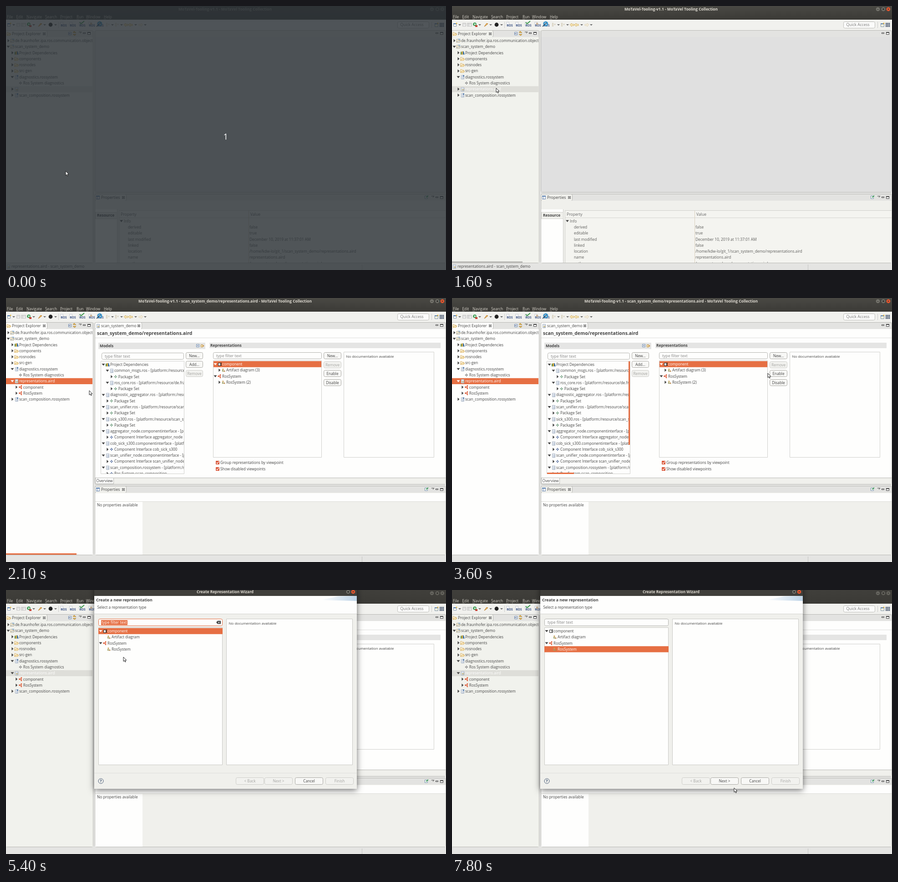
These frames come from a looping animation (967 by 579 pixels, 8 s). An HTML page with a canvas:

```html
<!DOCTYPE html>
<html lang="en">
<head>
<meta charset="utf-8">
<title>Representation wizard</title>
<style>
html, body { margin: 0; width: 100%; height: 100%; overflow: hidden; background: #3c3b37; }
canvas { display: block; }
</style>
</head>
<body>
<canvas id="stage" width="967" height="579"></canvas>
<script>
const g = document.getElementById('stage').getContext('2d');
const ORANGE = '#e66f43', INK = '#444', SOFT = '#5c5c5a', GREY = '#f0f0ec', EDGE = '#b9b9b5', WHITE = '#fefefd';
const FACE = '"Open Sans", "Noto Sans", sans-serif';
const PLAIN = 8.3, TAB = 8.6, BOLD = 'bold 8.4';
const APP = 'MoTaVel-Tooling-v1.1', SUITE = 'MoTaVel Tooling Collection';
const LOOP = 8000;

// ---- primitives ----
function box(x, y, w, h, fill, edge, r = 0) {
  g.beginPath();
  if (edge) g.roundRect(x + .5, y + .5, w - 1, h - 1, r);
  else g.roundRect(x, y, w, h, r);
  if (fill) { g.fillStyle = fill; g.fill(); }
  if (edge) { g.strokeStyle = edge; g.lineWidth = 1; g.stroke(); }
}
function text(s, x, y, color = INK, size = PLAIN, align = 'left') {
  g.font = `${size}px ${FACE}`;
  g.textAlign = align;
  g.fillStyle = color;
  g.fillText(s, x, y + 3);
}
function dot(x, y, r, color) {
  g.beginPath();
  g.arc(x, y, r, 0, 7);
  g.fillStyle = color;
  g.fill();
}
function poly(points, fill, edge, width = 1) {
  g.beginPath();
  for (let i = 0; i < points.length; i += 2) g.lineTo(points[i], points[i + 1]);
  if (fill) { g.closePath(); g.fillStyle = fill; g.fill(); }
  if (edge) { g.strokeStyle = edge; g.lineWidth = width; g.stroke(); }
}
function arrow(x, y, open, color = '#444') {
  poly(open ? [x - 3.5, y - 2, x + 3.5, y - 2, x, y + 2.5] : [x - 1.5, y - 3.5, x + 2.5, y, x - 1.5, y + 3.5], color);
}
const drop = (x, y) => poly([x - 3, y - 1, x + 3, y - 1, x, y + 2], '#666');
function cross(x, y) {
  poly([x - 2.5, y - 2.5, x + 2.5, y + 2.5], null, '#555', 2.4);
  poly([x + 2.5, y - 2.5, x - 2.5, y + 2.5], null, '#555', 2.4);
  poly([x - 2, y - 2, x + 2, y + 2], null, '#eee', .8);
  poly([x + 2, y - 2, x - 2, y + 2], null, '#eee', .8);
}
function clipped(x, y, w, h, draw) {
  g.save();
  g.beginPath();
  g.rect(x, y, w, h);
  g.clip();
  draw();
  g.restore();
}
function button(label, x, y, w, h, on = true, fill = '#f8f8f6') {
  box(x, y, w, h, on ? fill : '#f2f2ef', on ? '#aaa9a4' : '#cdcdc9', 3);
  text(label, x + w / 2, y + h / 2, on ? INK : '#a3a3a0', PLAIN, 'center');
}
function field(x, y, w, h, edge = '#b3b3af') {
  box(x, y, w, h, WHITE, edge, 3);
  text('type filter text', x + 7, y + h / 2, '#858585', 8.6);
}
function panelTools(x, y, menu) {
  if (menu) poly([x - 22, y - 3, x - 16, y - 3, x - 19, y], null, '#444');
  box(x - 13, y - 2, 6, 3, WHITE, '#444');
  box(x - 3, y - 3, 7, 6, WHITE, '#444');
  box(x - 3, y - 3, 7, 2, '#444');
}

// ---- tree views ----
const icons = {
  p(x, y) {
    box(x - 1, y - 4, 5, 4, '#d5e5f5', '#6a97c4');
    icons.f(x, y, '#a99b78', '#dfe7ee');
  },
  f(x, y, edge = '#d0a04a', fill = '#fcefc6') {
    poly([x - 4, y + 3.5, x - 4, y - 3, x - 1, y - 3, x, y - 1.5, x + 3, y - 1.5, x + 3, y], '#fdf8e6', edge, .8);
    poly([x - 4, y + 3.5, x - 2, y + .5, x + 5, y + .5, x + 3, y + 3.5, x - 4, y + 3.5], fill, edge, .8);
  },
  l(x, y) {
    box(x - 4, y - 2, 2, 6, '#4c8b4c');
    box(x - 2, y - 3, 3, 7, '#d9a93e');
    poly([x + 1, y - 3, x + 3, y - 3, x + 5, y + 4, x + 1, y + 4], '#4679a8');
  },
  d(x, y) {
    box(x - 3, y - 4, 7, 9, '#f6f8fb', '#a3afc0');
    for (let k = -1; k < 3; k++) box(x - 1, y + k * 1.5, 4, .6, '#8fa2bd');
  },
  m(x, y) { icons.d(x, y); box(x + 1, y - 4, 3, 3, '#5d83b2'); },
  a(x, y) { icons.d(x, y); box(x - 1, y, 4, 3, '#cdc092'); },
  s(x, y, c = '#666') {
    poly([x, y - 3, x + .8, y - .8, x + 3, y, x + .8, y + .8, x, y + 3, x - .8, y + .8, x - 3, y, x - .8, y - .8, x, y - 3], '#fff', c, .9);
  },
  g(x, y) { icons.s(x, y, '#508a62'); },
  b(x, y) { icons.s(x, y, '#3a5791'); },
  r(x, y) {
    poly([x + 3, y - 3, x - 2, y, x + 3, y + 3], null, '#d4523a');
    dot(x - 2, y, 1.7, '#e0633f');
    dot(x + 2, y - 3, 1.4, '#e0633f');
    dot(x + 2, y, 1.2, '#e0633f');
    dot(x + 2, y + 3, 1.4, '#e0633f');
  },
  c(x, y) {
    box(x - 3, y - 3, 6, 7, '#fff', '#222');
    box(x + 3, y - 3, 2, 2, '#222');
    box(x + 3, y + 1, 2, 2, '#222');
  },
  t(x, y) {
    dot(x - 1, y - 2, 1.6, '#c9a15a');
    box(x - 3, y, 3, 3, '#9aa268');
    poly([x + 2, y - .5, x + 4, y + 3.5, x, y + 3.5], '#b98a4e');
  }
};
// Each row: depth, arrow (v open, > closed, - none), icon, label
function tree(rows, x, y, selected, bar) {
  rows.forEach((row, i) => {
    const [depth, state, icon] = row, cx = x + depth * 8.9, cy = y + i * 13.28;
    const hit = i === selected;
    if (hit) box(bar.x, cy - 6.6, bar.w, 13.3, bar.color);
    if (state !== '-') arrow(cx, cy, state === 'v', hit && bar.color === ORANGE ? '#fff' : '#444');
    icons[icon](cx + 9, cy);
    if (!hit || !bar.mute) text(row.slice(3), cx + 15, cy, hit ? '#fff' : INK);
  });
}
const PROJECT = ['0>pde.fraunhofer.ipa.ros.communication.objects', '0vpscan_system_demo',
  '1>lProject Dependencies', '1>fcomponents', '1>frosnodes', '1>fsrc-gen',
  '1vmdiagnostics.rossystem', '2-sRos System diagnostics', '1>arepresentations.aird'];
const LAST = '1>mscan_composition.rossystem';
const OPENED = [...PROJECT.slice(0, 8), '1varepresentations.aird', '2>rcomponent', '2>rRosSystem', LAST];
const MODELS = ['0vlProject Dependencies',
  '1vdcommon_msgs.ros - [platform:/resource/de.f', '2>gPackage Set',
  '1vdros_core.ros - [platform:/resource/de.fraun', '2>gPackage Set',
  '0vddiagnostic_aggregator.ros - [platform:/resource', '1>gPackage Set',
  '0vdscan_unifier.ros - [platform:/resource/scan_sys', '1>gPackage Set',
  '0vdsick_s300.ros - [platform:/resource/scan_system', '1>gPackage Set',
  '0vdaggregator_node.componentinterface - [platform', '1>bComponent Interface aggregator_node',
  '0vdcob_sick_s300.componentinterface - [platform:/', '1>bComponent Interface cob_sick_s300',
  '0vdscan_unifier_node.componentinterface - [platform', '1>bComponent Interface scan_unifier_node',
  '0vdscan_composition.rossystem - [platform:/resource', '1>bRos System scan_composition'];
const VIEWS = ['0vccomponent', '1>tArtifact diagram (3)', '0vrRosSystem', '1>tRosSystem (2)'];
const TYPES = ['0vccomponent', '1-tArtifact diagram', '0vrRosSystem', '1-tRosSystem'];
const INFO = [['derived', 'false'], ['editable', 'true'], ['last modified', 'December 10, 2019 at 11:37:01 AM'],
  ['linked', 'false'], ['location', '/home/kdw-lo/git_1/scan_system_demo/representations.aird'],
  ['name', 'representations.aird'], ['path', '/scan_system_demo/representations.aird']];

// ---- window parts ----
function windowButtons(xs, y, active) {
  xs.forEach((x, i) => {
    const last = i === xs.length - 1;
    dot(x, y, 4.3, last && active ? '#e9562d' : active ? '#74736c' : '#65645e');
    if (last) {
      poly([x - 1.7, y - 1.7, x + 1.7, y + 1.7], null, '#3c3b37');
      poly([x + 1.7, y - 1.7, x - 1.7, y + 1.7], null, '#3c3b37');
    } else box(x - 2, y - (i === xs.length - 2 ? 2 : 0), 4, i === xs.length - 2 ? 4 : 1, '#3c3b37');
  });
}
function toolbar() {
  box(0, 30, 967, 24, '#f1f1ee');
  box(3, 38, 7, 7, '#fffdf3', '#8191ac');
  box(3, 38, 7, 2, '#4a75ae');
  dot(10, 38, 1.6, '#e8bd46');
  for (const x of [27, 37, 40]) { box(x - 4, 37, 8, 8, '#dededd', '#c6c6c5'); box(x - 2, 41, 4, 3, '#eee'); }
  dot(50, 40, 3.8, '#3b9b50');
  poly([49, 38, 53, 40, 49, 42], '#fff');
  box(51, 42, 5, 4, '#c74438');
  poly([71, 45, 76, 38, 79, 39, 74, 43], '#efbd61', '#bc7d2c');
  dot(98, 41, 4.4, '#222');
  for (const x of [17, 61, 85, 109, 234, 254, 285, 306]) drop(x, 41);
  for (let y = 35; y < 49; y += 2) { box(115, y, 1, 1, '#aaa'); box(935, y, 1, 1, '#aaa'); }
  for (const x of [125, 145, 166, 187, 206]) {
    box(x - 6, 35, 7, 9, '#f7f7f7', '#c9cdd3');
    text('ROS', x + 2, 42, '#3c5384', 'bold 6.6', 'center');
  }
  poly([162, 36, 165, 39, 172, 33], null, '#3e9a4c', 2);
  dot(187, 39, 2.4, '#cbb294');
  dot(206, 39, 5.4, '#3c97cd');
  dot(206, 39, 2.4, '#d9e8f2');
  poly([199, 45, 208, 37], null, '#223e58', 1.6);
  for (const x of [223, 243]) { box(x - 3, 37, 3, 8, '#ece8dc', '#d3ccb8'); poly([x + 1, 39, x + 5, 39, x + 3, 43], '#d8d2c0'); }
  for (const [x, s] of [[264, -1], [274, -1], [296, 1]])
    poly([x + 5 * s, 41, x + s, 38, x + s, 40, x - 4 * s, 40, x - 4 * s, 43, x + s, 43, x + s, 45, x + 5 * s, 41], s < 0 ? '#fbecc0' : '#f5efdf', s < 0 ? '#c9a24c' : '#dccfae', .8);
  box(860, 34, 70, 15, '#fbfbfa', '#bdbdb9', 3);
  text('Quick Access', 892, 41, '#777', 8.5, 'center');
  box(942, 38, 8, 8, '#f9f3dd', '#7d93ad');
  box(942, 38, 8, 2, '#5b82ae');
  dot(949, 38, 1.6, '#e3b43d');
  for (let i = 0; i < 9; i++) box(953 + i % 3 * 3.4, 37 + (i / 3 | 0) * 3.2, 2.5, 2.4, '#40506a');
}
function panel(x, y, w, h, tabWidth, label, fill) {
  box(x, y, w, h, '#e3e3e1', EDGE, 3);
  if (!tabWidth) return;
  box(x, y, tabWidth, 16, fill, EDGE, 3);
  box(x + 1, y + 15, w - 2, h - 16, fill);
  text(label, x + 14, y + 8, INK, TAB);
  cross(x + tabWidth - 7, y + 8);
}
function explorer(s) {
  const fill = s.picked && !s.dialog ? WHITE : '#f1f2ed';
  panel(-1, 53, 193, 511, 92, 'Project Explorer', fill);
  icons.f(6, 61);
  box(137, 57, 7, 7, '#e9f0f8', '#7590b0');
  box(138, 60, 4, 1, '#446');
  poly([154, 59, 147, 58, 150, 55], '#e1b14a', '#a78032', .7);
  poly([147, 62, 154, 62, 151, 65], '#e1b14a', '#a78032', .7);
  panelTools(182, 60, true);
  const bar = { x: 0, w: 190, color: s.picked && !s.dialog ? ORANGE : '#deded9', mute: s.countdown };
  clipped(0, 68, 190, 495, () => tree(s.picked ? OPENED : [...PROJECT, LAST], 5, 76, 8, bar));
  if (s.t >= 400 && s.t < 2500) box(0, 560, 155, 3, s.picked ? ORANGE : '#bcbcb8');
}
function properties(s) {
  panel(195, 412, 772, 152, 70, 'Properties', GREY);
  box(198, 416, 8, 8, '#fff', '#6b87ae');
  box(198, 416, 8, 2, '#4f78ad');
  box(201, 416, 1, 8, '#6b87ae');
  box(920, 416, 7, 7, '#fff', '#7894ad');
  poly([923, 420, 928, 416], null, '#45a058', 2);
  panelTools(957, 420, true);
  if (s.opened) {
    box(196, 428, 770, 18, WHITE);
    box(196, 446, 770, 1, '#dcdcd8');
    box(196, 447, 104, 116, WHITE);
    text('No properties available', 200, 454);
    return;
  }
  box(196, 446, 49, 117, WHITE);
  box(244, 446, 1, 117, '#c8c8c4');
  box(196, 452, 49, 15, GREY, '#d5d5d1');
  text('Resource', 200, 459, INK, BOLD);
  clipped(248, 448, 718, 115, () => {
    box(248, 448, 720, 120, '#f4f4f0', '#cfcfcb');
    box(249, 464, 717, 1, '#d5d5d1');
    box(533, 449, 1, 120, '#d9cebc');
    text('Property', 252, 457, '#666', TAB);
    text('Value', 537, 457, '#666', TAB);
    arrow(253.5, 471.5, true);
    text('Info', 259, 471.5, SOFT);
    INFO.forEach(([key, value], i) => {
      text(key, 268, 485 + i * 13.28, SOFT);
      text(value, 535, 485 + i * 13.28, SOFT);
    });
  });
}
function editor(s) {
  if (!s.opened) {
    panel(195, 53, 772, 356);
    box(196, 68, 770, 340, '#e0e0e0');
    return panelTools(957, 60);
  }
  panel(195, 53, 772, 356, 104, 'scan_system_demo', WHITE);
  icons.a(202, 61);
  panelTools(957, 60);
  text('scan_system_demo/representations.aird', 200, 78, INK, 'bold 10.4');
  box(196, 87, 770, 1, '#dededc');
  box(203, 98, 235, 14, '#e5e5e4');
  text('Models', 206, 105, INK, BOLD);
  box(418, 101, 7, 7, '#e9f0f8', '#7590b0');
  box(420, 104, 3, 1, '#446');
  box(428, 102, 5, 6, '#f6e7bc', '#b78d42');
  poly([432, 103, 436, 105, 432, 107], '#c48b38');
  box(447, 98, 508, 12, '#e5e5e4');
  text('Representations', 449, 104, INK, BOLD);
  field(210, 120, 181, 15);
  button('New...', 395, 119, 38, 15);
  button('Add...', 395, 138, 38, 15);
  button('Remove', 395, 158, 38, 15, false);
  box(208, 138, 184, 248, WHITE, '#d0d0cd');
  clipped(209, 139, 182, 246, () => tree(MODELS, 214, 146));
  if (s.t >= 2600 && s.t < 4200) {
    box(388, 139, 3, 183, ORANGE);
    box(209, 383, 59, 3, ORANGE);
  }
  field(455, 119, 239, 15);
  box(455, 137, 239, 213, WHITE, '#d0d0cd');
  tree(VIEWS, 460, 145, 0, { x: 456, w: 237, color: ORANGE });
  const pressed = s.t >= 4200 && s.t < 4300;
  button('New...', 698, 119, 39, 15, true, pressed ? '#deded9' : undefined);
  button('Remove', 698, 139, 39, 15, false);
  button('Enable', 698, 158, 39, 15);
  button('Disable', 698, 178, 39, 15);
  box(742, 118, 199, 232, WHITE, '#d0d0cd');
  text('No documentation available', 747.5, 127.5, INK, 8);
  ['Group representations by viewpoint', 'Show disabled viewpoints'].forEach((label, i) => {
    const y = 361 + i * 14;
    box(461, y - 4, 8, 8, '#d9573a', null, 1);
    poly([462.5, y, 464.5, y + 2, 468, y - 3], null, '#fff', 1.2);
    text(label, 471, y);
  });
  box(196, 395, 770, 13, GREY);
  box(196, 394, 770, 1, EDGE);
  box(196, 394, 41, 14, WHITE, EDGE);
  text('Overview', 198.5, 401);
}
function dialog(s) {
  const chosen = s.t >= 6600;
  g.save();
  g.shadowColor = 'rgba(0,0,0,.55)';
  g.shadowBlur = 13;
  g.shadowOffsetY = 3;
  box(194, -10, 577, 446, GREY);
  g.restore();
  box(194, 0, 577, 13, '#403f3b');
  text('Create Representation Wizard', 481.5, 4, '#dfdbd2', BOLD, 'center');
  windowButtons([752, 763], 4, true);
  box(194, 13, 577, 39, WHITE);
  const sky = g.createLinearGradient(690, 0, 771, 0);
  sky.addColorStop(0, '#fff');
  sky.addColorStop(1, '#bdd3e6');
  poly([690, 22, 730, 14, 771, 13, 771, 24], sky);
  box(194, 52, 577, 1, '#d3d3d0');
  text('Create a new representation', 198, 22, INK, 'bold 8.7');
  text('Select a representation type', 200.5, 38);
  field(203, 63, 273, 16, chosen ? '#b3b3af' : ORANGE);
  if (!chosen) {
    box(209, 66, 58, 11, ORANGE);
    text('type filter text', 210, 71, '#fff', 8.6);
    poly([462, 71, 465, 67.5, 472, 67.5, 472, 74.5, 465, 74.5], '#444');
    poly([466, 69.5, 469.5, 73], null, '#fff');
    poly([469.5, 69.5, 466, 73], null, '#fff');
  }
  box(203, 82, 273, 302, WHITE, '#cacac6');
  tree(TYPES, 208, 90, chosen ? 3 : 0, { x: 203, w: 273, color: ORANGE });
  box(484, 63, 278, 321, WHITE, '#cacac6');
  if (s.t >= 4900) text('No documentation available', 489.5, 72.5, INK, 8);
  box(194, 401, 577, 1, '#dededb');
  g.beginPath();
  g.arc(208.5, 419, 5.5, 0, 7);
  g.strokeStyle = '#4b5d78';
  g.stroke();
  text('?', 208.5, 419, '#39506f', 'bold 9', 'center');
  button('< Back', 505, 411, 62, 16, false);
  button('Next >', 568, 411, 62, 16, chosen);
  button('Cancel', 635, 411, 62, 16);
  button('Finish', 702, 411, 62, 16, false);
}

// ---- pointer: time, x, y ----
const PATH = [[0, 131, 362], [300, 131, 362], [800, 117, 221], [900, 117, 221], [1000, 102, 192], [1100, 102, 192],
  [1200, 97, 180], [1800, 97, 180], [2100, 183, 203], [2400, 235, 205], [2700, 555, 150], [3000, 498, 181],
  [3200, 498, 181], [3400, 497, 175], [3500, 497, 175], [3600, 694, 165], [3700, 694, 165], [3800, 739, 145],
  [3900, 739, 145], [4000, 713, 129], [5000, 713, 129], [5200, 520, 216], [5400, 258, 147], [5900, 258, 147],
  [6100, 250, 126], [7000, 250, 126], [7300, 477, 388], [7400, 477, 388], [7600, 600, 486], [7800, 620, 434], [LOOP, 620, 434]];
function pointer(t) {
  const i = PATH.findIndex(p => p[0] > t);
  const [t0, x0, y0] = PATH[i - 1], [t1, x1, y1] = PATH[i];
  const k = (t - t0) / (t1 - t0);
  const x = x0 + (x1 - x0) * k, y = y0 + (y1 - y0) * k;
  const shape = [0, 0, 0, 9.5, 2.2, 7.6, 3.8, 11, 5.3, 10.3, 3.8, 7, 6.8, 7, 0, 0];
  poly(shape.map((v, n) => v + (n % 2 ? y : x)), '#fff', '#111', .9);
}

function draw(t) {
  const s = { t, countdown: t < 100, picked: t >= 1700, opened: t >= 1900, dialog: t >= 4600 };
  const active = t >= 1600 && !s.dialog;
  box(0, 0, 967, 579, '#e4e4e2');
  const top = g.createLinearGradient(0, 0, 0, 30);
  top.addColorStop(0, active ? '#4a4944' : '#403f3b');
  top.addColorStop(1, '#3b3a36');
  box(0, 0, 967, 30, top);
  const title = s.opened ? `${APP} - scan_system_demo/representations.aird - ${SUITE}` : `${APP} - ${SUITE}`;
  text(title, 481.5, 7, active ? '#dfdbd2' : '#8c8981', BOLD, 'center');
  windowButtons([936, 948, 959], 7, active);
  [['File', 2], ['Edit', 22.5], ['Navigate', 45], ['Search', 86], ['Project', 119], ['Run', 155], ['Window', 176], ['Help', 215]]
    .forEach(([label, x]) => {
      text(label, x, 23.5, '#d5d1c8');
      box(x, 28, 5, .7, '#b0ada5');
    });
  toolbar();
  explorer(s);
  editor(s);
  properties(s);
  if (!s.opened) {
    icons.a(5, 571);
    text('representations.aird - scan_system_demo', 12, 571);
  }
  for (let y = 568; y < 578; y += 3) box(782, y, 1, 1, '#888');
  if (s.dialog) dialog(s);
  if (s.countdown) {
    box(0, 0, 967, 579, 'rgba(42,49,54,.81)');
    text('1', 483, 290, '#fff', 18, 'center');
  }
  pointer(t);
}

function tick() {
  draw(Math.floor(performance.now() % LOOP / 100) * 100);
  requestAnimationFrame(tick);
}
tick();
</script>
</body>
</html>
```
